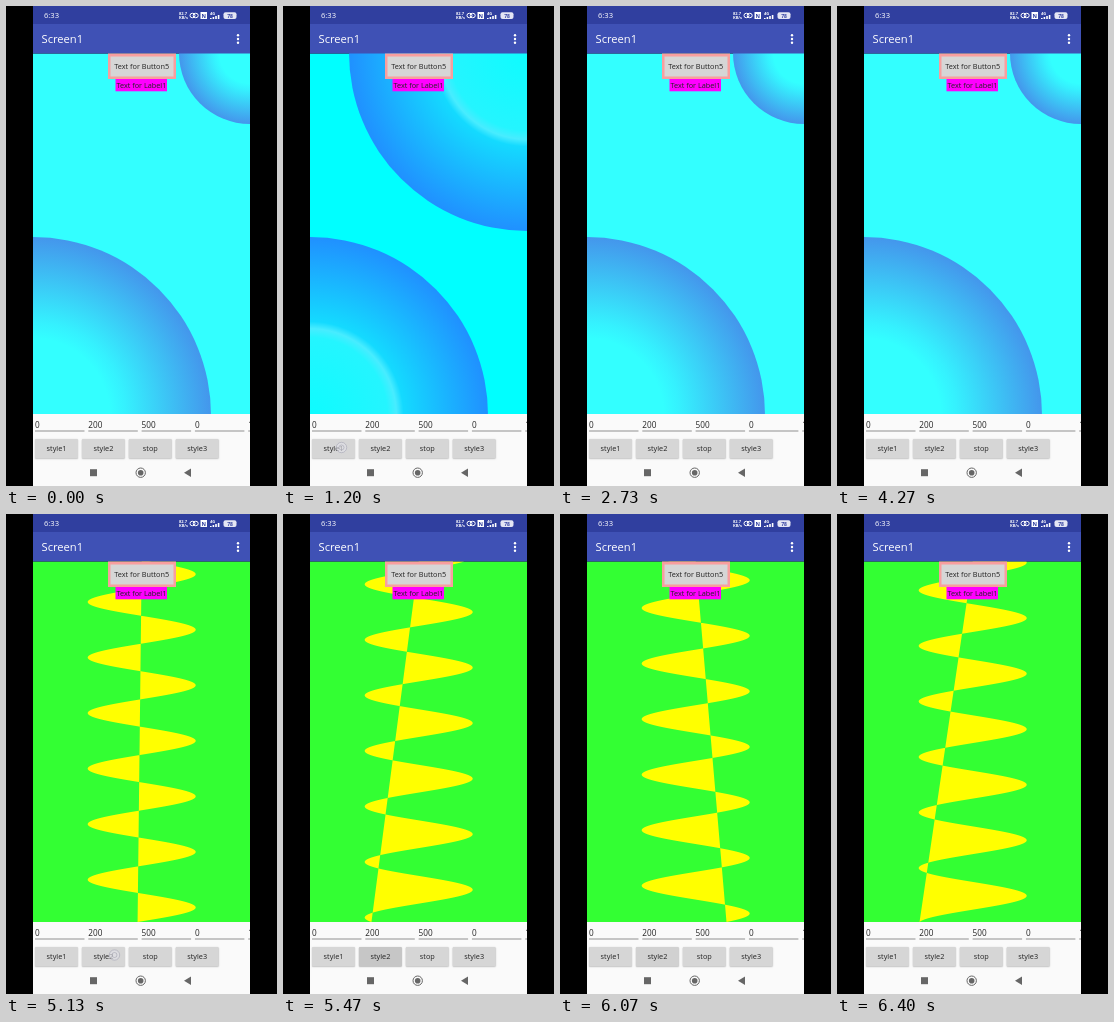
Recreate the animation shown at these times as an HTML page with a canvas. Size 271 px wide and 480 px high, loop 6470 ms.

```html
<!DOCTYPE html>
<html lang="en">
<head>
<meta charset="utf-8">
<title>Screen1</title>
<style>
html, body { margin: 0; height: 100%; overflow: hidden; background: #000; }
canvas { display: block; width: 100vw; height: 100vh; }
</style>
</head>
<body>
<canvas></canvas>
<script>
const W = 271, H = 480, LOOP = 6470, STEP = 200 / 3;
const LEFT = 27, RIGHT = 244, TOP = 47.5, BOTTOM = 408;
const canvas = document.querySelector('canvas');
const ctx = canvas.getContext('2d');
const scale = window.devicePixelRatio || 1;
canvas.width = W * scale;
canvas.height = H * scale;

const lerp = (a, b, k) => a + (b - a) * k;
const progress = (t, from, to) => Math.min(1, Math.max(0, (t - from) / (to - from)));
const ease = k => k * k * (3 - 2 * k);
const mixColor = (a, b, k) => `rgb(${a.map((v, i) => Math.round(lerp(v, b[i], k)))})`;

function rect(x, y, w, h, color) {
  ctx.fillStyle = color;
  ctx.fillRect(x, y, w, h);
}

function text(str, x, y, size, color = '#222', align = 'left', weight = 400) {
  ctx.font = `${weight} ${size}px "Open Sans", "Noto Sans", sans-serif`;
  ctx.textAlign = align;
  ctx.fillStyle = color;
  ctx.fillText(str, x, y);
}

function circle(x, y, r, color) {
  ctx.fillStyle = color;
  ctx.beginPath();
  ctx.arc(x, y, r, 0, 2 * Math.PI);
  ctx.fill();
}

// Each stop: offset relative to the ring, calm colour, vivid colour.
const GLOW = [
  [-0.05, [51, 255, 255], [36, 245, 255]],
  [0, [52, 247, 255], [72, 236, 255]],
  [0.04, [53, 241, 254], [20, 218, 255]]
];

function glow(x, y, r, ring, vivid) {
  const g = ctx.createRadialGradient(x, y, 0, x, y, r);
  g.addColorStop(0, mixColor([51, 255, 255], [14, 252, 255], vivid));
  for (const [offset, calm, strong] of GLOW)
    g.addColorStop(Math.max(0, ring + offset), mixColor(calm, strong, vivid));
  g.addColorStop(1, mixColor([68, 150, 236], [32, 144, 255], vivid));
  circle(x, y, r, g);
}

function drawCircles(t) {
  const vivid = ease(progress(t, 70, 670)) - ease(progress(t, 1800, 2330))
    + ease(progress(t, 2930, 3330)) - ease(progress(t, 3930, 4270));
  let ring = 0.48;
  if (t >= 1000 && t < 1800) ring = lerp(0.8, 0.06, progress(t, 1000, 1470));
  else if (t >= 1800) ring = lerp(0.06, 0.48, progress(t, 1800, 2330));
  rect(LEFT, TOP, RIGHT - LEFT, BOTTOM - TOP, mixColor([51, 255, 255], [0, 255, 255], vivid));
  glow(LEFT, 409, 178, ring, vivid);
  glow(RIGHT, 47, lerp(71, 178, vivid), ring, vivid);
}

function drawWave(t) {
  const middle = 135.7, period = 55.54;
  const phase = 1.645 + 6 * (t - 5133) / 1000;
  rect(LEFT, TOP, RIGHT - LEFT, BOTTOM - TOP, '#3f3');
  ctx.fillStyle = '#ff0';
  ctx.beginPath();
  ctx.moveTo(middle, TOP);
  for (let y = TOP; y <= BOTTOM; y += 0.5)
    ctx.lineTo(middle + 54 * Math.cos(2 * Math.PI * (y - BOTTOM) / period + phase), y);
  ctx.fill();
}

function drawHeader() {
  rect(LEFT, 0, 217, 18, '#303f9f');
  rect(LEFT, 18, 217, 29.5, '#3f51b5');
  text('6:33', 38, 12.2, 7.6, '#fff');
  text('Screen1', 35.5, 37, 11.2, '#fff', 'left', 500);
  for (const y of [29.2, 33, 36.8]) circle(232, y, 1.2, '#fff');

  text('82.7', 173, 8.6, 4, '#fff', 'left', 700);
  text('KB/s', 173, 12.6, 4, '#fff', 'left', 700);
  ctx.strokeStyle = '#fff';
  ctx.lineWidth = 1;
  for (const x of [184, 187.2]) {
    ctx.beginPath();
    ctx.roundRect(x, 7.3, 5, 4.4, 2.2);
    ctx.stroke();
  }
  rect(194.5, 6, 6.5, 7, '#fff');
  text('N', 197.7, 11.6, 5.5, '#303f9f', 'center', 700);
  text('4G', 204, 8.6, 4, '#fff', 'left', 700);
  for (let i = 0; i < 4; i++) rect(204 + i * 2.6, 12 - i, 1.6, 1 + i, '#fff');
  ctx.fillStyle = '#e4e6f4';
  ctx.beginPath();
  ctx.roundRect(217.5, 6.2, 13, 6.8, 2);
  ctx.fill();
  text('78', 224, 11.6, 5, '#303f9f', 'center', 700);
}

function drawOverlay() {
  rect(102, 47.5, 68, 25.5, '#f99e9e');
  rect(104.5, 50.5, 63, 20, '#d6d6d6');
  text('Text for Button5', 135.7, 63.4, 7.3, '#222', 'center');
  rect(109.5, 73, 51.5, 12.3, '#f0f');
  text('Text for Label1', 135.4, 82, 7.3, '#222', 'center');
}

function drawControls(t) {
  rect(LEFT, BOTTOM, 217, H - BOTTOM, '#fafafa');
  ['0', '200', '500', '0', '1'].forEach((value, i) => {
    const x = 29 + i * 53.3;
    text(value, x, 421.6, 8.2);
    rect(x, 424.6, 49.5, 0.8, '#777');
  });
  const pressed = progress(t, 5130, 5330) - progress(t, 5730, 6200);
  ['style1', 'style2', 'stop', 'style3'].forEach((label, i) => {
    const x = 29 + i * 46.9;
    ctx.fillStyle = mixColor([214, 214, 214], [198, 198, 198], i === 1 ? pressed : 0);
    ctx.shadowColor = 'rgba(0,0,0,.25)';
    ctx.shadowBlur = 1.5 * scale;
    ctx.shadowOffsetY = 0.5 * scale;
    ctx.beginPath();
    ctx.roundRect(x, 433, 43, 19.5, 1);
    ctx.fill();
    ctx.shadowColor = 'transparent';
    text(label, x + 21.5, 445.2, 7.3, '#222', 'center');
  });

  rect(84, 463.2, 7, 7, '#666');
  ctx.strokeStyle = '#666';
  ctx.lineWidth = 1;
  ctx.beginPath();
  ctx.arc(134.7, 466.7, 4.7, 0, 2 * Math.PI);
  ctx.stroke();
  circle(134.7, 466.7, 2.8, '#666');
  ctx.fillStyle = '#666';
  ctx.beginPath();
  ctx.moveTo(178, 466.7);
  ctx.lineTo(185, 462.4);
  ctx.lineTo(185, 471);
  ctx.fill();
}

function drawTap(x, y) {
  circle(x, y, 5.5, 'rgba(225,225,230,.65)');
  ctx.strokeStyle = 'rgba(150,150,165,.6)';
  ctx.lineWidth = 0.8;
  for (const r of [2.5, 5.2]) {
    ctx.beginPath();
    ctx.arc(x, y, r, 0, 2 * Math.PI);
    ctx.stroke();
  }
}

function draw(now) {
  const t = Math.floor((now % LOOP + 5) / STEP) * STEP;
  ctx.setTransform(scale, 0, 0, scale, 0, 0);
  rect(0, 0, W, H, '#000');
  ctx.save();
  ctx.beginPath();
  ctx.rect(LEFT, 0, RIGHT - LEFT, H);
  ctx.clip();
  t < 4930 ? drawCircles(t) : drawWave(t);
  drawHeader();
  drawOverlay();
  drawControls(t);
  if (t >= 1000 && t < 1330) drawTap(58.5, 441.5);
  if (t >= 4930 && t < 5330) drawTap(108.5, 441);
  ctx.restore();
}

let start;
function tick(now) {
  start ??= now;
  draw(now - start);
  requestAnimationFrame(tick);
}
draw(0);
requestAnimationFrame(tick);
</script>
</body>
</html>
```
